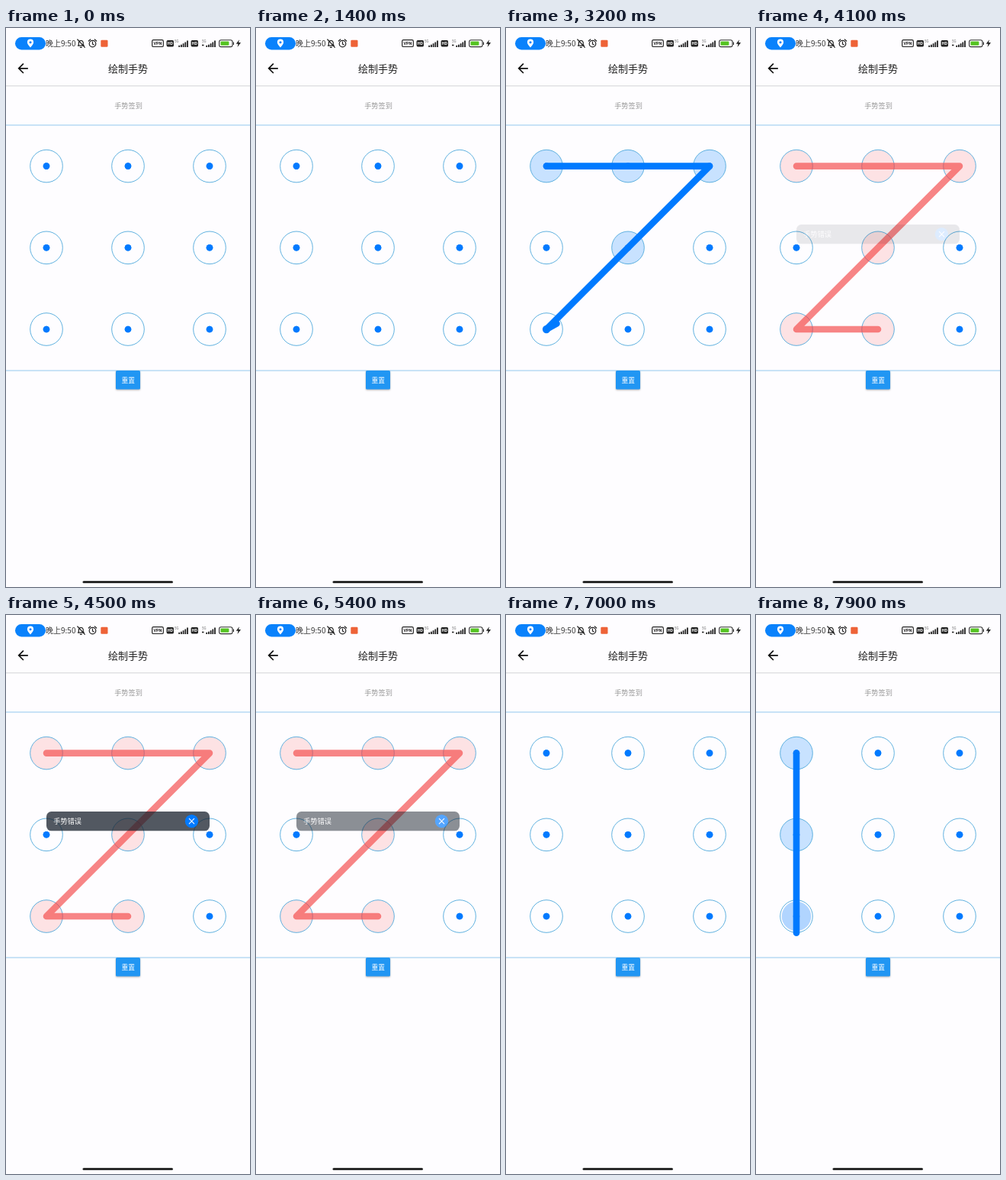
These frames come from a looping animation (320 px wide and 731 px high, 8 s). An HTML page:

```html
<!DOCTYPE html>
<html lang="zh-CN">
<head>
<meta charset="utf-8">
<title>绘制手势</title>
<style>
  html, body { margin: 0; width: 100%; height: 100%; overflow: hidden; background: #fefdff; }
  svg { display: block; width: 100%; height: 100%; font-family: "Noto Sans CJK SC", "Noto Sans CJK", sans-serif; font-weight: 300; }
  .mid { text-anchor: middle; }
  .tiny { font: bold 5.4px Roboto, sans-serif; text-anchor: middle; }
  .net { font: 4.5px Roboto, sans-serif; fill: #777; }
  .line { fill: none; stroke-linecap: round; stroke-linejoin: round; }
  .shadow { filter: drop-shadow(0 1px 1.2px rgba(0, 0, 0, .3)); }
</style>
</head>
<body>
<svg viewBox="0 0 320 731">
  <defs>
    <radialGradient id="ink">
      <stop offset=".45" stop-color="#0d3c70" stop-opacity=".5"/>
      <stop offset="1" stop-color="#0d3c70" stop-opacity=".2"/>
    </radialGradient>
    <g id="bars">
      <path d="M0 9v-2.2M2.7 9V5.7M5.4 9V4.2M8.1 9V2.5M10.8 9V.6" stroke="#222" stroke-width="1.8"/>
    </g>
    <g id="hd">
      <rect width="9.4" height="8.4" rx="1.6" fill="#222"/>
      <text class="tiny" x="4.7" y="6.2" fill="#fff">HD</text>
    </g>
  </defs>

  <!-- status bar -->
  <rect x="12" y="12" width="40" height="16.5" rx="8.2" fill="#0a82fc"/>
  <path d="M32 25.5c-2.5-3-4.1-4.8-4.1-6.8a4.1 4.1 0 0 1 8.2 0c0 2-1.6 3.8-4.1 6.8z" fill="#fff"/>
  <circle cx="32" cy="18.7" r="1.5" fill="#0a82fc"/>
  <text x="52" y="23.8" font-size="10" fill="#333">晚上9:50</text>
  <g class="line" stroke="#222" stroke-width="1.2">
    <path d="M94.5 23.2h7.8l-1.1-1.8v-2.7a3 3 0 0 0-5.8 0v2.7zM97.3 25.3h2M93.8 15l9.5 10.4"/>
    <circle cx="113.5" cy="20.6" r="4.3"/>
    <path d="M113.5 18.2v2.7l1.8 1M108.3 17l2.4-2M118.7 17l-2.4-2"/>
  </g>
  <rect x="124.3" y="15.7" width="9.2" height="9" rx="1.3" fill="#ee6338"/>
  <rect x="191.7" y="15.7" width="14.6" height="8.8" rx="1.6" fill="none" stroke="#222" stroke-width="1.2"/>
  <text class="tiny" x="199" y="22.1" fill="#222">VPN</text>
  <use href="#hd" x="210.6" y="16"/>
  <text class="net" x="221" y="18.5">5G</text>
  <use href="#bars" x="227.2" y="16"/>
  <use href="#hd" x="242.6" y="16"/>
  <text class="net" x="257" y="18.5">5G</text>
  <path d="M257 22.5h2.5" stroke="#222" stroke-width="1.6"/>
  <use href="#bars" x="263.2" y="16"/>
  <rect x="279.6" y="15.8" width="17.4" height="8.8" rx="2.4" fill="none" stroke="#333" stroke-width="1.1"/>
  <path d="M298.4 18.4v3.6" stroke="#333" stroke-width="1.2"/>
  <rect x="281.4" y="17.6" width="11" height="5.2" rx="1" fill="#55c322"/>
  <path d="M306 15.2l-4.3 5.5h2.8l-1 4.3 4.5-5.9h-2.9z" fill="#222"/>

  <!-- app bar and page -->
  <path class="line" d="M28 52.8H17M22.3 47.2l-5.6 5.6 5.6 5.6" stroke="#111" stroke-width="1.7" style="stroke-linecap:square;stroke-linejoin:miter"/>
  <text class="mid" x="160" y="58" font-size="13" fill="#222">绘制手势</text>
  <path d="M0 75.5h320" stroke="#dedee0"/>
  <path d="M0 76.5h320" stroke="#f3f3f5"/>
  <text class="mid" x="160.5" y="105.2" font-size="9.2" fill="#999">手势签到</text>
  <path d="M0 127h320M0 448h320" stroke="#93c8ee"/>
  <rect x="100.5" y="723" width="118.5" height="3" rx="1.5" fill="#2b2b2b"/>

  <rect class="shadow" x="144" y="448" width="32" height="24.5" rx="1.5" fill="#2196f3"/>
  <rect id="press" x="144" y="448" width="32" height="24.5" rx="1.5" fill="url(#ink)"/>
  <text class="mid" x="160.3" y="464.3" font-size="8.8" fill="#fff">重置</text>

  <g id="nodes"></g>
  <polyline id="trace" class="line" stroke-width="8.6"/>

  <g id="toast">
    <rect x="53" y="257" width="214" height="25.3" rx="6.5" fill="#18222c" fill-opacity=".75"/>
    <text x="62.3" y="273.4" font-size="9.2" fill="#fff">手势错误</text>
    <circle cx="243.5" cy="269.6" r="8.7" fill="#007aff"/>
    <path class="line" d="M240.3 266.4l6.4 6.4m0-6.4l-6.4 6.4" stroke="#fff" stroke-width="1.1"/>
  </g>
</svg>
<script>
const LOOP = 8000, STEP = 100, GROW = 200, DOT = 4.3, RING = 21.3;
const BLUE = '#007aff', RED = '#f54545';
const $ = id => document.getElementById(id);
const clamp = v => Math.max(0, Math.min(1, v));
const ramp = (t, a, b) => clamp((t - a) / (b - a));
const mix = (a, b, k) => a + (b - a) * k;

// hits: [node, time]; path: [time, x, y] of the finger
const strokes = [
  {
    hits: [[0, 1560], [1, 2190], [2, 2540], [4, 2890], [6, 3190], [7, 3580]],
    path: [[1560, 53, 181], [1800, 72, 181], [2000, 108, 180], [2200, 151, 179.3], [2400, 195, 180],
           [2540, 250, 181], [2640, 267, 181], [2700, 260, 188], [2900, 174, 273], [3200, 66.5, 386.5],
           [3300, 58, 395], [3450, 80, 396], [3600, 144, 394], [3750, 160, 394]],
    fail: 3800, clear: 5880
  },
  {
    hits: [[0, 7450], [3, 7595], [6, 7724]],
    path: [[7450, 53, 181], [7600, 53, 270], [7724, 53, 373], [7900, 53, 415.7]],
    fail: Infinity, clear: Infinity
  }
];

function add(tag, attrs) {
  const el = document.createElementNS('http://www.w3.org/2000/svg', tag);
  set(el, attrs);
  return $('nodes').appendChild(el);
}
function set(el, attrs) {
  for (const k in attrs) el.setAttribute(k, attrs[k]);
}

const nodes = Array.from({ length: 9 }, (_, i) => {
  const x = 53 + i % 3 * 107, y = 180.6 + Math.floor(i / 3) * 106.7;
  const at = { cx: x, cy: y };
  return {
    x, y,
    halo: add('circle', at),
    dot: add('circle', { ...at, r: DOT, fill: BLUE }),
    ring: add('circle', { ...at, r: RING, fill: 'none', stroke: '#4fa9dc', 'stroke-width': .9 })
  };
});

function finger(path, t) {
  const i = path.findIndex(p => p[0] > t);
  if (i < 0) return path.at(-1).slice(1);
  const [a, b] = [path[i - 1], path[i]], k = ramp(t, a[0], b[0]);
  return [mix(a[1], b[1], k), mix(a[2], b[2], k)];
}

function draw(t) {
  const s = strokes.findLast(s => t >= s.hits[0][1]);
  const hits = s ? s.hits.filter(h => t >= h[1]) : [];
  const live = s && t < s.clear;
  const failed = live && t >= s.fail;

  nodes.forEach((n, i) => {
    const hit = hits.find(h => h[0] === i);
    const p = !hit ? 0 : live ? clamp((t - hit[1]) / GROW) : 1 - clamp((t - s.clear) / GROW);
    set(n.halo, {
      r: mix(DOT, RING, p),
      fill: failed && hit ? RED : BLUE,
      'fill-opacity': mix(1, failed ? .14 : .21, p)
    });
    set(n.dot, { opacity: failed && hit ? 0 : 1 });
  });

  const points = live ? hits.map(([i]) => [nodes[i].x, nodes[i].y]) : [];
  if (live && !failed) points.push(finger(s.path, t));
  set($('trace'), {
    points: points.join(' '),
    stroke: failed ? RED : BLUE,
    opacity: failed ? .65 : 1
  });

  set($('toast'), { opacity: ramp(t, 4050, 4450) * (1 - ramp(t, 5250, 5700)) });
  set($('press'), { opacity: ramp(t, 5820, 5960) * (1 - ramp(t, 6150, 6700)) });
}

const start = performance.now();
function frame() {
  const t = (performance.now() - start) % LOOP;
  draw(Math.floor(t / STEP) * STEP);
  requestAnimationFrame(frame);
}
frame();
</script>
</body>
</html>
```
